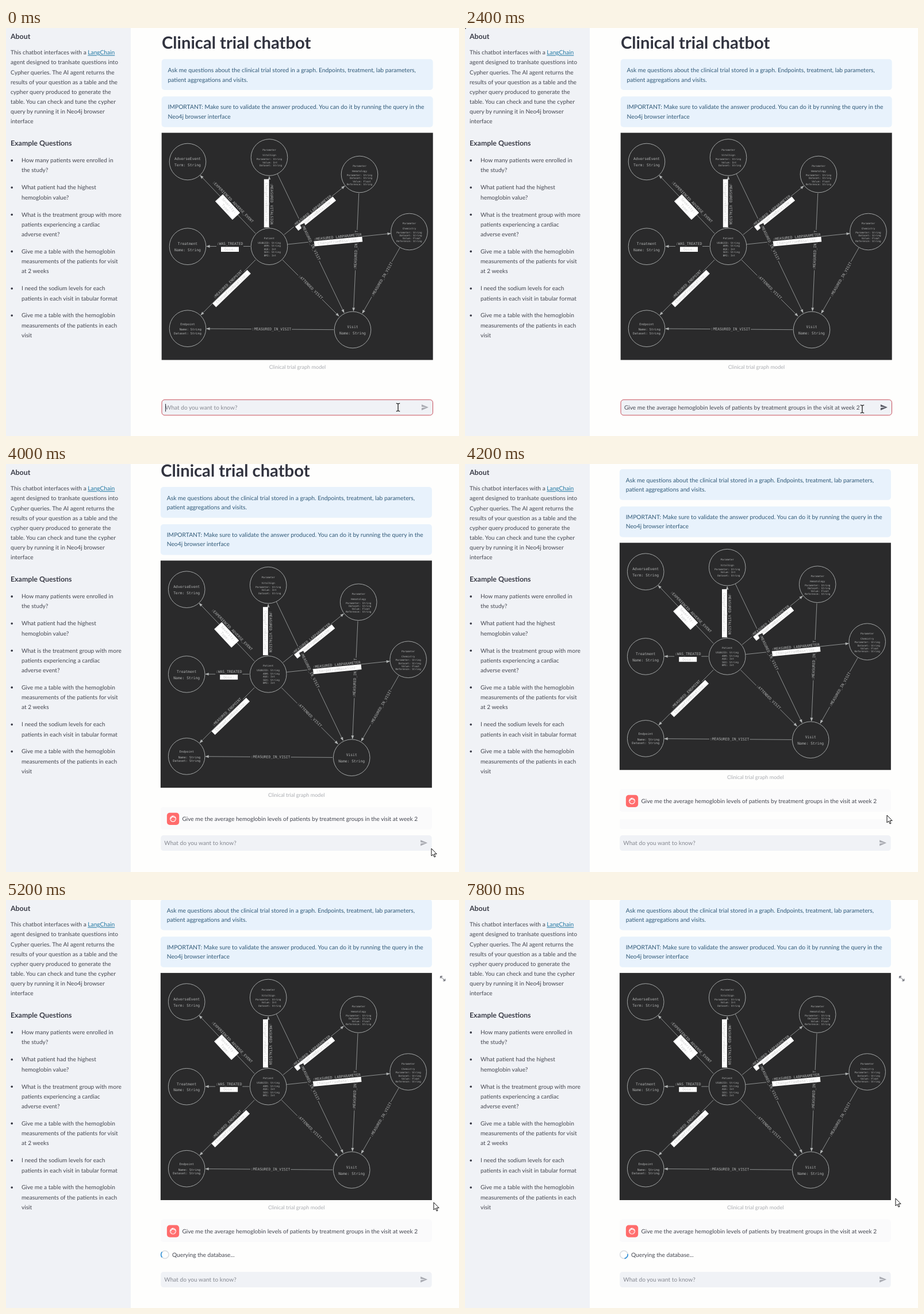
Animation of 788x711 px, one loop 8000 ms. Source, as an HTML page:

```html
<!DOCTYPE html>
<html lang="en">
<head>
<meta charset="utf-8">
<title>Clinical trial chatbot</title>
<style>
  html, body { margin: 0; width: 100%; height: 100%; overflow: hidden; background: #fefefd; }
  svg { display: block; width: 100%; height: 100%; }
  text { font: 10.2px Lato, "Open Sans", sans-serif; fill: #454751; white-space: pre; text-rendering: geometricPrecision; }
  .head { font-size: 12.4px; font-weight: 700; fill: #3a3c47; }
  .title { font-size: 29.2px; font-weight: 700; fill: #31333f; }
  .info { font-size: 10.3px; fill: #315a78; }
  .ask { font-size: 10.13px; }
  .link { fill: #1f77a3; text-decoration: underline; }
  .cap { font-size: 9.1px; fill: #a9abb0; text-anchor: middle; }
  .mono { font-family: "DejaVu Sans Mono", "Noto Sans Mono", monospace; fill: #b2b4b4; }
  .mid { text-anchor: middle; }
  .prop { fill: #cdcdcd; }
  .node { fill: #2a2a2b; stroke: #a3a6a6; stroke-width: 1; }
  .edge { stroke: #999c9c; stroke-width: .9; }
  .tip { fill: #b0b3b3; }
</style>
</head>
<body>
<svg id="stage" viewBox="0 0 788 711"></svg>
<script>
const NS = 'http://www.w3.org/2000/svg';
const stage = document.getElementById('stage');
const DARK = '#2a2a2b';

function add(parent, tag, attrs = {}, content) {
  const el = document.createElementNS(NS, tag);
  for (const k in attrs) el.setAttribute(k, attrs[k]);
  if (content !== undefined) el.textContent = content;
  parent.appendChild(el);
  return el;
}
const rect = (p, x, y, width, height, fill, rx = 0) =>
  add(p, 'rect', { x, y, width, height, fill, rx });
const text = (p, x, y, s, cls = '') => add(p, 'text', { x, y, class: cls }, s);
const lines = (p, x, y, step, list, cls) =>
  list.forEach((s, i) => text(p, x, y + i * step, s, cls));
const show = (el, on) => el.setAttribute('visibility', on ? 'visible' : 'hidden');

// ---- page that scrolls
const page = add(stage, 'g');
text(page, 271, 36, 'Clinical trial chatbot', 'title');
rect(page, 270.7, 54.3, 472, 53.7, '#e8f2fc', 5);
lines(page, 281.5, 77, 16.7, [
  'Ask me questions about the clinical trial stored in a graph. Endpoints, treatment, lab parameters,',
  'patient aggregations and visits.'], 'info');
rect(page, 270.7, 119.3, 472, 53.4, '#e8f2fc', 5);
lines(page, 281.5, 141, 16.7, [
  'IMPORTANT: Make sure to validate the answer produced. You can do it by running the query in the',
  'Neo4j browser interface'], 'info');
text(page, 507, 594, 'Clinical trial graph model', 'cap');

// ---- graph model
const graph = add(page, 'g');
rect(graph, 270.7, 182.6, 472, 395.9, DARK);

function mono(p, x, y, s, size, cls = '') {
  text(p, x, y, s, 'mono ' + cls).style.fontSize = size + 'px';
}
function edge(x1, y1, x2, y2) {
  add(graph, 'line', { x1, y1, x2, y2, class: 'edge' });
  const a = Math.atan2(y2 - y1, x2 - x1) * 180 / Math.PI;
  add(graph, 'path', { d: 'M1 0L-5.5-2.4V2.4Z', class: 'tip', transform: `translate(${x2} ${y2}) rotate(${a})` });
}
// title, then "key: type" rows aligned on the colon
function node(x, y, size, heads, rows, rowY, step) {
  add(graph, 'circle', { cx: x, cy: y, r: 31.8, class: 'node' });
  heads.forEach(([s, dy]) => mono(graph, x, y + dy, s, size, 'mid'));
  const pad = Math.max(...rows.map(r => r.indexOf(':')));
  const full = rows.map(r => ' '.repeat(pad - r.indexOf(':')) + r);
  const w = Math.max(...full.map(r => r.length)) * size * .602;
  full.forEach((r, i) => mono(graph, x - w / 2, y + rowY + i * step, r, size));
}
function label(x, y, angle, s) {
  const g = add(graph, 'g', { transform: `translate(${x} ${y}) rotate(${angle})` });
  const w = s.length * 3.8 + 2;
  rect(g, -w / 2, -4, w, 8, DARK);
  mono(g, 0, 2.2, s, 6.3, 'mid');
}
function prop(x, y, angle, w, h, list) {
  const g = add(graph, 'g', { transform: `translate(${x} ${y}) rotate(${angle})` });
  rect(g, -w / 2, -h / 2, w, h, '#fff');
  list.forEach((s, i) => mono(g, 0, 2.2 + (i - (list.length - 1) / 2) * 7.4, s, 6.3, 'mid prop'));
}

[[434, 358, 338, 257], [458, 348, 458, 259], [484, 360, 589, 275.5], [490, 377, 669, 358],
 [425, 380.5, 349, 380.5], [434, 404, 339, 500], [481, 404, 579, 502], [472, 254, 588, 496],
 [613.8, 288, 604.5, 493], [685, 383, 620, 497], [570, 525.7, 349, 524]].forEach(e => edge(...e));

const lab = ['Parameter: String', 'Dataset: String', 'Value: Float', 'Reference: String'];
node(316, 233, 6.35, [['AdverseEvent', -3]], ['Term: String'], 8, 0);
node(316, 380.7, 6.35, [['Treatment', -2.6]], ['Name: String'], 8.2, 0);
node(603, 526, 6.35, [['Visit', -3]], ['Name: String'], 8.4, 0);
node(316, 523.7, 5.3, [['Endpoint', -6]], ['Name: String', 'Dataset: String'], 3.4, 6.5);
node(458, 225.5, 4.35, [['Parameter', -11.7], ['VitalSign', -2.3]],
  ['Parameter: String', 'Value: Int', 'Dataset: String'], 4.7, 5.4);
node(615, 255, 4.35, [['Parameter', -13], ['Hematology', -3.9]], lab, 3.1, 5.2);
node(701.5, 355, 4.35, [['Parameter', -13], ['Chemistry', -3.9]], lab, 2.8, 5.2);
node(458, 380.7, 4.4, [['Patient', -13]],
  ['USUBJID: String', 'ARM: String', 'AGE: Int', 'SEX: String', 'BMI: Int'], -5, 5.5);

const base = ['ChangeFromBaseline:'];
label(395, 303, 45.6, ':EXPERIENCED_ADVERSE_EVENT');
prop(385.5, 312, 47, 44, 18, ['Severity:', 'Type:']);
rect(graph, 456, 264, 4, 83, DARK);
label(462, 306.5, 90, ':MEASURED_VITALSIGN');
prop(453.2, 305.5, 90, 84, 8.8, base);
label(533, 318.5, -38.8, ':MEASURED_LABPARAMETER');
prop(538.5, 323.5, -38.8, 84, 9, base);
label(530.5, 373.5, 64.4, ':MEASURED_IN_VISIT');
label(608.6, 387, -88, ':MEASURED_IN_VISIT');
label(577, 364, -5.6, ':MEASURED_LABPARAMETER');
prop(578, 372, -5.6, 84, 9, base);
rect(graph, 366, 377, 47, 7, DARK);
label(389.5, 376, 0, ':WAS_TREATED');
prop(389.5, 385.7, 0, 31, 8.6, ['Dose:']);
label(386, 446.5, -44, ':MEASURED_ENDPOINT');
prop(392.5, 454, -44, 84, 9, base);
label(530, 451.5, 45, ':ATTENDED_VISIT');
label(654, 438, -60, ':MEASURED_IN_VISIT');
label(462, 524.6, .4, ':MEASURED_IN_VISIT');

// ---- asked question
const ASK = 'Give me the average hemoglobin levels of patients by treatment groups in the visit at week 2';
const asked = add(page, 'g');
rect(asked, 270.7, 612, 472, 39.5, '#fafafb', 5);
rect(asked, 281.7, 622, 21.3, 21.3, '#ff6c6c', 5);
const face = add(asked, 'g', { transform: 'translate(292.3 632.6)', fill: 'none', stroke: '#fff', 'stroke-width': 1.2 });
add(face, 'circle', { r: 4.9 });
add(face, 'path', { d: 'M-4.7-.6Q-1.6-1.4-.9-4.4Q1-1.6 4.6-2' });
add(face, 'path', { d: 'M-1.8 .9v.9M1.8 .9v.9' });
text(asked, 308.3, 636, ASK, 'ask');
const blank = rect(page, 270.7, 664, 472, 17.3, '#fafafb', 4);
const expand = add(page, 'path', {
  d: 'M757.4 188.5h3.6M757.4 188.5v3.6M757.6 188.7l3.4 3.4M765.6 196.4h-3.6M765.6 196.4v-3.6M765.4 196.2l-3.4-3.4',
  stroke: '#74767e', 'stroke-width': 1.3, fill: 'none' });

// ---- spinner
const busy = add(stage, 'g');
add(busy, 'circle', { cx: 276.4, cy: 618, r: 6.8, fill: 'none', stroke: '#d9dbdf', 'stroke-width': 1.5 });
const arc = add(busy, 'path', { d: 'M-4.8-4.8A6.8 6.8 0 0 1 4.8-4.8', fill: 'none', stroke: '#2d8fd8', 'stroke-width': 1.6 });
text(busy, 289, 621.6, 'Querying the database...');

// ---- input bar
const bar = add(stage, 'g');
const field = rect(bar, 271, 647.8, 471.5, 27, '#f0f2f6', 5);
const button = add(bar, 'path', { d: 'M716 647.5h21.5a5 5 0 0 1 5 5v17.5a5 5 0 0 1-5 5H716Z', fill: '#ff4b4b' });
const typed = text(bar, 277, 665, '', 'ask');
const caret = rect(bar, 277, 655, 1.1, 13.5, '#31333f');
const send = add(bar, 'path', {
  d: 'M2 21L23 12 2 3V10L17 12 2 14Z', transform: 'translate(721.8 654.2) scale(.57)' });

// ---- sidebar
const side = add(stage, 'g');
rect(side, 0, 0, 217, 711, '#f0f2f6');
text(side, 8, 19.3, 'About', 'head');
const first = text(side, 8, 46.3, '');
add(first, 'tspan', {}, 'This chatbot interfaces with a ');
add(first, 'tspan', { class: 'link' }, 'LangChain');
lines(side, 8, 63.4, 17.13, [
  'agent designed to tranlsate questions into', 'Cypher queries. The AI agent returns the',
  'results of your question as a table and the', 'cypher query produced to generate the',
  'table. You can check and tune the cypher', 'query by running it in Neo4j browser', 'interface']);
text(side, 8, 205.3, 'Example Questions', 'head');
[[234.2, 'How many patients were enrolled in', 'the study?'],
 [281.3, 'What patient had the highest', 'hemoglobin value?'],
 [328.6, 'What is the treatment group with more', 'patients experiencing a cardiac', 'adverse event?'],
 [392.7, 'Give me a table with the hemoglobin', 'measurements of the patients for visit', 'at 2 weeks'],
 [457.3, 'I need the sodium levels for each', 'patients in each visit in tabular format'],
 [504.3, 'Give me a table with the hemoglobin', 'measurements of the patients in each', 'visit']
].forEach(([y, ...list]) => {
  add(side, 'circle', { cx: 10.2, cy: y - 3.3, r: 1.8, fill: '#31333f' });
  lines(side, 27, y, 17.2, list, 'ask');
});
const speck = rect(side, 0, 0, 1.5, 1.5, '#333');

// ---- pointers, each drawn around its hot spot
const outline = { fill: '#fff', stroke: '#111', 'stroke-width': 1, 'stroke-linejoin': 'round' };
const pointers = {
  beam: add(stage, 'path', {
    d: 'M-3.2-6.8Q-.4-6.8 0-5.6Q.4-6.8 3.2-6.8M0-5.8V5.8M-3.2 6.8Q-.4 6.8 0 5.6Q.4 6.8 3.2 6.8',
    fill: 'none', stroke: '#111', 'stroke-width': 1.2 }),
  arrow: add(stage, 'path', { d: 'M0 0V13L3 10.3 5.1 15 7 14.2 5 9.6H9.2Z', ...outline }),
  hand: add(stage, 'path', {
    d: 'M-1 10V1.2a1.5 1.5 0 0 1 3 0V7l1-.6a1.3 1.3 0 0 1 1.8 1a1.3 1.3 0 0 1 2.2.8a1.2 1.2 0 0 1 2 1' +
       'V13c0 2-1 3-1.5 4.5V19H1V17.8C0 16-2 14-4 11.3C-5 9.8-3.4 8.6-2 9.6ZM2 7v4M4.8 8v3M7 8.6v2.6', ...outline })
};

// ---- timeline: [from ms, ...values]
const POINTER = [
  [0, 'beam', 682, 661], [200, 'beam', 685, 662], [400, 'beam', 688, 663], [600, 'beam', 691, 664],
  [2600, 'beam', 710, 667], [2800, 'arrow', 734, 672], [3000, 'arrow', 741, 673], [3200, 'hand', 739.5, 670.5],
  [4000, 'arrow', 740, 670], [4200, 'arrow', 734, 612], [4400, 'arrow', 726, 549], [4600, 'arrow', 728, 543],
  [4800, 'arrow', 733, 537], [5000, 'arrow', 740, 530], [5200, 'arrow', 744, 527], [5400, 'arrow', 746, 524],
  [5600, 'arrow', 748, 521], [5800, 'arrow', 749, 520]];
const SCROLL = [[0, 0], [4000, -14.3], [4200, -45.3], [4800, -55.5]];
const BORDER = [[0, '#c8505c'], [3600, '#e3b9c2'], [4000, 'none']];
const CARET = [[0, true], [600, false], [1200, true], [1600, false]];

const at = (table, t) => table.filter(r => r[0] <= t).pop().slice(1);

function draw(t) {
  const sent = t >= 4000, filled = t >= 2000 && !sent, hover = t >= 3200 && !sent;
  const dx = sent ? -1.8 : 0;

  page.setAttribute('transform', `translate(${dx} ${at(SCROLL, t)[0]})`);
  show(asked, sent);
  show(blank, t >= 4200 && t < 4800);
  show(expand, t >= 4400);
  show(busy, t >= 4800);
  arc.setAttribute('transform', `translate(276.4 618) rotate(${270 + (t - 5200) / 722 * 360})`);

  bar.setAttribute('transform', `translate(${dx} ${sent ? (t < 4800 ? -.7 : .3) : 0})`);
  field.setAttribute('stroke', at(BORDER, t)[0]);
  typed.textContent = filled ? ASK : 'What do you want to know?';
  typed.style.fill = filled ? '#454751' : '#858891';
  send.setAttribute('fill', hover ? '#fff' : filled ? '#595b65' : '#a8aab1');
  show(button, hover);
  show(caret, at(CARET, t)[0]);
  show(speck, t >= 400 && !sent);

  const [kind, x, y] = at(POINTER, t);
  for (const k in pointers) show(pointers[k], k === kind);
  pointers[kind].setAttribute('transform', `translate(${x} ${y})`);
}

function tick() {
  const t = performance.now() % 8000;
  draw(Math.floor(t / 200) * 200);
  requestAnimationFrame(tick);
}
tick();
</script>
</body>
</html>
```
